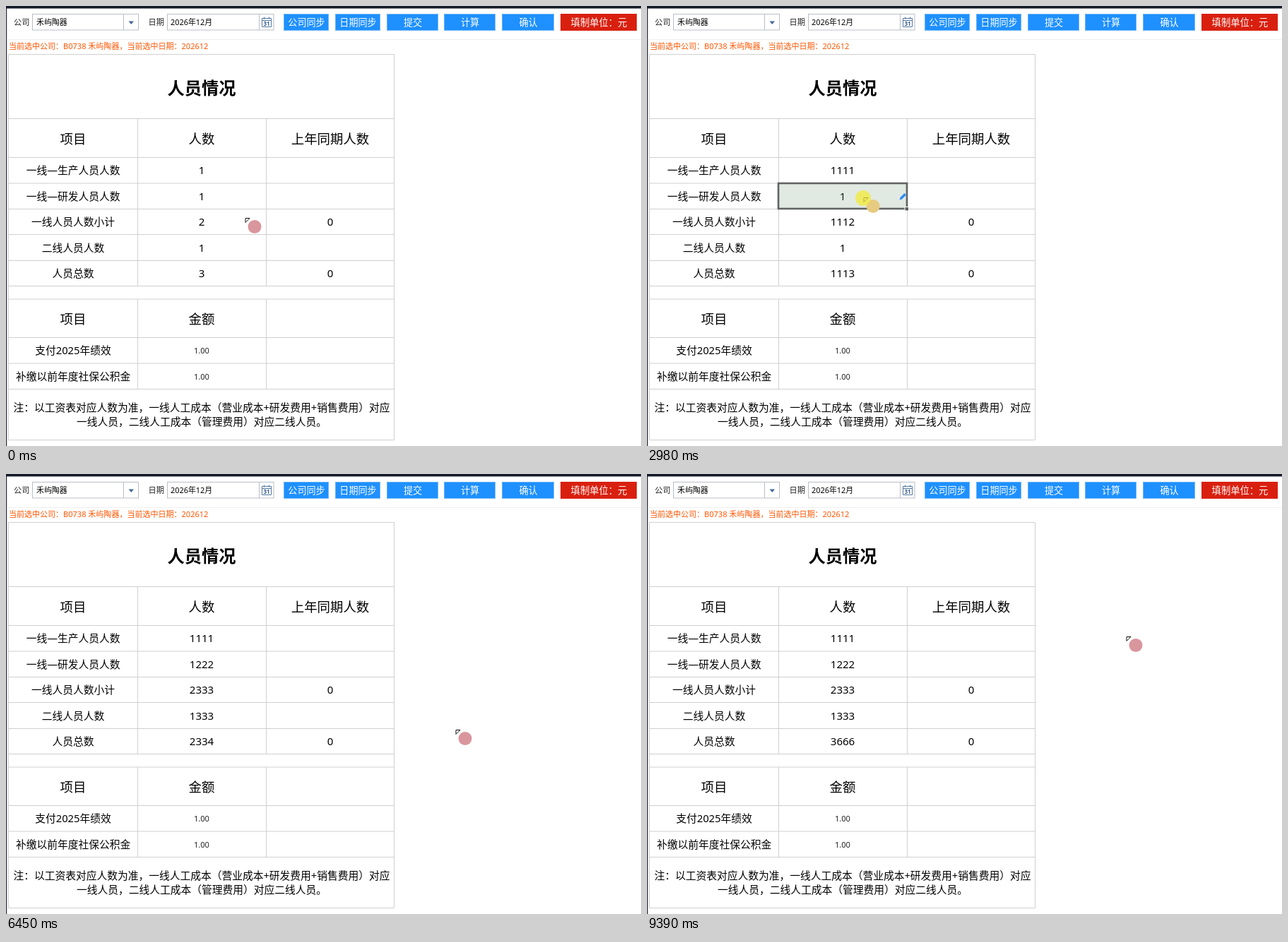
An HTML page that plays this animation: 899x623 px, repeating every 9.46 s.

```html
<!DOCTYPE html>
<html lang="zh-CN">
<head>
<meta charset="utf-8">
<title>人员情况</title>
<style>
html, body { margin: 0; width: 100%; height: 100%; overflow: hidden; background: #fff; }
svg { display: block; width: 899px; height: 623px; }
text { font-family: "Noto Sans", "Noto Sans CJK SC", "Noto Sans CJK", sans-serif; font-weight: 350; white-space: pre; }
</style>
</head>
<body>
<svg id="stage" viewBox="0 0 899 623" xmlns="http://www.w3.org/2000/svg">
  <defs>
    <filter id="shadow" x="-10%" y="-40%" width="120%" height="180%">
      <feDropShadow dx="0" dy="0" stdDeviation="3.5" flood-color="#000" flood-opacity=".25"/>
    </filter>
  </defs>
</svg>
<script>
const LOOP = 9460;
const stage = document.getElementById('stage');

function add(tag, attrs, parent = stage) {
  const node = document.createElementNS('http://www.w3.org/2000/svg', tag);
  set(node, attrs);
  parent.append(node);
  return node;
}
function set(node, attrs) {
  for (const key in attrs) node.setAttribute(key, attrs[key]);
}
function show(node, on) {
  node.style.display = on ? '' : 'none';
}
function rect(x, y, width, height, attrs, parent) {
  return add('rect', { x, y, width, height, ...attrs }, parent);
}
function path(d, attrs, parent) {
  return add('path', { d, fill: 'none', ...attrs }, parent);
}
// Text is placed by its vertical centre.
function label(str, x, middle, size, { weight, ...attrs } = {}, parent) {
  const node = add('text', { x, y: middle + size * 0.365, 'font-size': size, fill: '#000', ...attrs }, parent);
  if (weight) node.style.fontWeight = weight;
  node.textContent = str;
  return node;
}
function centred(str, x, middle, size, attrs) {
  return label(str, x, middle, size, { 'text-anchor': 'middle', ...attrs });
}

// Toolbar
rect(0, 0, 899, 3.5, { fill: '#151b28' });
rect(0, 3, 1.2, 620, { fill: '#252b38' });
rect(1, 47, 898, 1, { fill: '#f0f0f0' });

const box = { fill: '#fff', stroke: '#b9bec6' };
label('公司', 11, 23, 11.2, { fill: '#222' });
rect(37.5, 11.5, 150, 22.5, box);
path('M166.5 11.5V34', { stroke: '#b9bec6' });
path('M173.5 21.5h7.5l-3.7 4.5z', { fill: '#42699b' });
label('禾屿陶器', 43, 23, 10.9);
label('日期', 201.5, 23, 11.2, { fill: '#222' });
rect(228.5, 11.5, 150.5, 22.5, box);
path('M358.5 11.5V34', { stroke: '#b9bec6' });
label('2026年12月', 233, 23, 10.9);
path('M362.5 17.5h13v12h-13zM362.5 20.5h13M365.5 15.5v3M372.5 15.5v3', { stroke: '#54779f' });
centred('31', 369, 25.3, 8, { fill: '#33598a', weight: 700 });

function button(str, x, width, fill, edge, size = 13.1) {
  const face = rect(x - 0.5, 11.5, width, 23, { fill, stroke: edge });
  centred(str, x + width / 2, 23, size, { fill: '#fff' });
  return face;
}
const BLUE = '#1e90ff', BLUE_EDGE = '#6fb5f8', RED = '#d9200f';
button('公司同步', 394, 63, BLUE, BLUE_EDGE);
button('日期同步', 467, 63, BLUE, BLUE_EDGE);
const submit = button('提交', 540, 72, BLUE, BLUE_EDGE);
button('计算', 621, 72, BLUE, BLUE_EDGE);
button('确认', 703, 73, BLUE, BLUE_EDGE);
button('填制单位：元', 786, 107, RED, RED, 13.3);
label('当前选中公司：B0738 禾屿陶器，当前选中日期：202612', 4, 57, 11.02, { fill: '#ff5500' });

// Table
const COLS = [95, 277, 459];
const lines = [68.5, 159.5, 214.5, 251, 287.5, 323.5, 360.5, 396.5, 415, 469.5, 506, 542.5, 614.5];
path(lines.map(y => `M3.5 ${y}H549.5`).join('') +
  'M3.5 68.5V614.5M549.5 68.5V614.5' +
  [186, 368].map(x => `M${x}.5 159.5V396.5M${x}.5 415V542.5`).join(''), { stroke: '#d0d0d0' });

centred('人员情况', 277, 116, 24.2, { weight: 700 });
['项目', '人数', '上年同期人数'].forEach((s, i) => centred(s, COLS[i], 188, 18.4));
['项目', '金额'].forEach((s, i) => centred(s, COLS[i], 443, 18.4));

const BODY = 14.75;
const FIGURE = { weight: 500 };
const rowY = i => 233 + 36.45 * i;
const counts = ['一线—生产人员人数', '一线—研发人员人数', '一线人员人数小计', '二线人员人数', '人员总数']
  .map((name, i) => {
    centred(name, COLS[0], rowY(i), BODY);
    if (i === 2 || i === 4) centred('0', COLS[2], rowY(i), 15, FIGURE);
    return centred('', COLS[1], rowY(i), 15, FIGURE);
  });
['支付2025年绩效', '补缴以前年度社保公积金'].forEach((name, i) => {
  centred(name, COLS[0], 488 + 36.5 * i, BODY);
  centred('1.00', COLS[1], 488 + 36.5 * i, 11, { fill: '#222' });
});
centred('注：以工资表对应人数为准，一线人工成本（营业成本+研发费用+销售费用）对应', 277, 569, BODY);
centred('一线人员，二线人工成本（管理费用）对应二线人员。', 277, 589, BODY);

// Selected cell, cell editor
const picked = add('g', {});
rect(186, 0, 182, 36, { fill: '#699173', 'fill-opacity': 0.2, stroke: '#606362', 'stroke-width': 2.6 }, picked);
rect(365, 33.5, 5.5, 5.5, { fill: '#606362', stroke: '#fff' }, picked);
const pencil = path('M357.5 23.5l1-3.5 6-6 2.5 2.5-6 6z', { fill: '#2b8cf0' }, picked);

const editor = add('g', {});
rect(186, 0, 182.5, 36.5, { fill: 'none', stroke: '#3d95f5' }, editor);
const caret = path('', { stroke: '#000' }, editor);

// Notice
const notice = add('g', {});
rect(569, 322, 209, 42.5, { rx: 2, fill: '#fff', filter: 'url(#shadow)' }, notice);
label('审核通过，上报成功', 611.5, 344, 10, { fill: '#555' }, notice);
path('M721.5 343l4 4.5 8.5-9', { stroke: '#2f86dc', 'stroke-width': 1.7 }, notice);

// Pointer
const pointer = add('g', {});
const arrow = add('g', {}, pointer);
const buddy = add('circle', { cx: 14, cy: 12.5, r: 9.5 }, arrow);
path('M1 .5h6l-6 6z', { fill: '#fff', stroke: '#111' }, arrow);
const beam = add('g', {}, pointer);
path('M1 -7.5a7 8 0 0 1 0 16z', { fill: '#d9a3a9' }, beam);
path('M-5 -10h9M-5 10h9M-.5 -10V10', { stroke: '#222', 'stroke-width': 3.4 }, beam);
path('M-4.2 -10h7.4M-4.2 10h7.4M-.5 -10V10', { stroke: '#eee', 'stroke-width': 1.2 }, beam);
const press = add('circle', { cx: 0, cy: 1, r: 11, fill: '#f2ec30', 'fill-opacity': 0.72 }, pointer);

// Timeline
const numbers = [
  [[0, '1'], [1160, '11'], [1260, '111'], [1360, '1111']],
  [[0, '1'], [3470, '12'], [3570, '122'], [3670, '1222']],
  [[0, '2'], [2250, '1112'], [4290, '2333']],
  [[0, '1'], [5440, '13'], [5540, '133'], [5640, '1333']],
  [[0, '3'], [2250, '1113'], [4290, '2334'], [6640, '3666']]
];
const focus = [
  [0, null], [600, 'pick', 0], [820, 'edit', 0], [1890, 'pick', 2], [2880, 'pick', 1], [3250, 'edit', 1],
  [4120, 'pick', 4], [4440, 'pick', 3], [4760, 'edit', 3], [6290, null]
];
const track = [
  [0, 338, 300], [70, 338, 300], [560, 300, 235], [1440, 300, 235], [1880, 303, 294], [2740, 303, 294],
  [2880, 306, 271], [3720, 306, 271], [4060, 303, 381], [4260, 303, 381], [4420, 307, 341], [5680, 307, 341],
  [5960, 470, 416], [6240, 636, 362], [6640, 636, 362], [7290, 581, 29], [7580, 581, 29], [7900, 634, 196],
  [9389, 634, 196], [9390, 678, 230], [LOOP, 678, 230]
];
const presses = [
  [590, 700], [760, 820], [1890, 2100], [2880, 3060], [3190, 3250], [4120, 4240],
  [4440, 4540], [4700, 4760], [6270, 6400], [7400, 7500], [9110, 9180]
];

const latest = (steps, t) => steps.filter(s => s[0] <= t).pop();
const within = (t, from, to) => t >= from && t < to;
const clamp = v => Math.max(0, Math.min(1, v));

function position(t) {
  const i = Math.max(1, track.findIndex(k => k[0] > t));
  const [t0, x0, y0] = track[i - 1], [t1, x1, y1] = track[i];
  const p = clamp((t - t0) / (t1 - t0)), ease = p * p * (3 - 2 * p);
  return [x0 + (x1 - x0) * ease, y0 + (y1 - y0) * ease];
}

function draw(t) {
  counts.forEach((node, i) => { node.textContent = latest(numbers[i], t)[1]; });

  const [since, mode, row] = latest(focus, t);
  show(picked, mode === 'pick');
  show(pencil, row !== 2 && row !== 4);
  show(editor, mode === 'edit');
  if (mode) {
    const top = lines[row + 2];
    set(mode === 'pick' ? picked : editor, { transform: `translate(0 ${top})` });
    const x = 279.5 + counts[row].textContent.length * 4.3;
    set(caret, { d: `M${x} 9v19` });
    show(caret, (t - since) % 1060 < 530);
  }

  const [x, y] = position(t);
  const typing = mode === 'edit' && x > 187 && x < 367 && Math.abs(y - rowY(row)) < 18;
  set(pointer, { transform: `translate(${x} ${y})` });
  show(arrow, !typing);
  show(beam, typing);
  show(press, presses.some(([from, to]) => within(t, from, to)));
  set(buddy, { fill: within(t, 2740, 3250) ? '#e6cb80' : '#d9969d' });

  set(submit, { fill: within(t, 7280, 8700) ? '#1f7fe5' : BLUE });
  set(notice, { opacity: clamp((t - 7610) / 200) * clamp((8880 - t) / 270) });
}

const start = performance.now();
function tick() {
  draw((performance.now() - start) % LOOP);
  requestAnimationFrame(tick);
}
tick();
</script>
</body>
</html>
```
